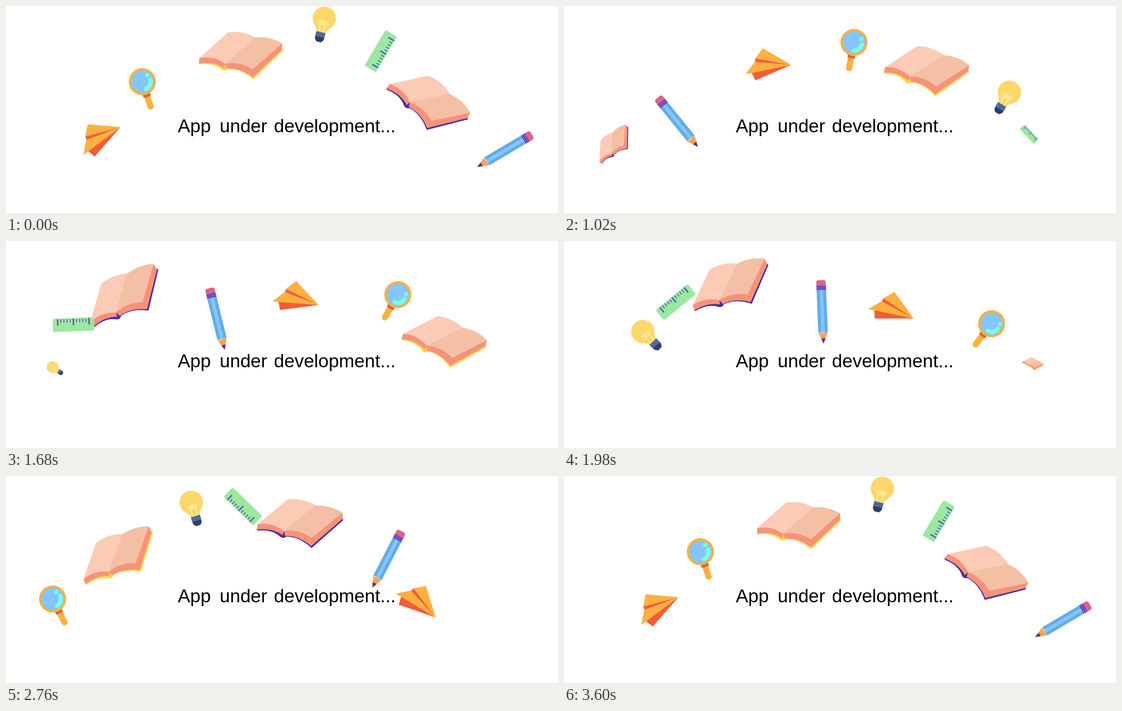
An HTML page that plays this animation: 1160x436 px, repeating every 3630 ms.

```html
<!DOCTYPE html>
<html lang="en">
<head>
<meta charset="utf-8">
<title>App under development</title>
<style>
  html, body { margin: 0; width: 100%; height: 100%; overflow: hidden; background: #fff; }
  svg { display: block; width: 100%; height: 100%; }
  text { font: 39px "Liberation Sans", Arial, sans-serif; }
  .orange { fill: #fcb040; }
  .red { fill: #f15d3a; }
</style>
</head>
<body>
<svg viewBox="0 0 1160 436">
  <defs>
    <g id="book" transform="translate(-493 -104)">
      <path fill="currentColor" d="M405 121L407 124Q436 119 454 134Q460 139 467 133Q494 132 520 154L582 93L580 88L519 148Q490 128 461 131Q434 113 406 119Z"/>
      <path fill="#f69279" d="M406 111V122Q437 116 461 132Q492 129 519 150L580 91V78L524 66Z"/>
      <path fill="#fbcbb6" d="M406 111L466 56Q497 51 524 66L461 122Q435 104 406 111Z"/>
      <path fill="#f3c0a5" d="M524 66Q555 63 580 78L519 133Q491 116 461 122Z"/>
      <path fill="currentColor" d="M461 122L458 134H465Z"/>
    </g>
  </defs>

  <text y="266"><tspan x="361">App</tspan> <tspan x="449">under</tspan> <tspan x="563">development...</tspan></text>

  <g id="purpleBook" color="#4c2d9f"><use href="#book" transform="scale(1.02)"/></g>
  <g id="yellowBook" color="#ffd33f"><use href="#book"/></g>

  <g id="plane">
    <path class="red" d="M-35 -8L39 -28L-32 0ZM-30 22L39 -28L-15 34Z"/>
    <path class="orange" d="M-30 -34L39 -28L-35 -8ZM-33 -1L39 -28L-39 31Z"/>
  </g>

  <g id="magnifier">
    <path class="orange" d="M-6.5 34H6.5V55A6.5 6.5 0 0 1 -6.5 55Z"/>
    <path fill="#d5683b" d="M-8 26H8V32L6.5 34H-6.5L-8 32Z"/>
    <circle class="orange" r="28.5"/>
    <circle r="23.5" fill="#85c5fd"/>
    <circle cx="14" cy="-10" r="4.5" fill="#7dfae4"/>
    <path d="M17 1A16.5 16.5 0 0 1 2 17" fill="none" stroke="#7dfae4" stroke-width="9" stroke-linecap="round"/>
  </g>

  <g id="bulb">
    <path fill="#fcd76a" d="M-9.5 31Q-11 23 -18 16.5A24.5 24.5 0 1 1 18 16.5Q11 23 9.5 31Z"/>
    <path fill="none" stroke="#fdf0a8" stroke-width="2" d="M-4 30L-6 14C-12 12 -11 5 -7 6S-4 14 -2 14S-3 5 0 5S1 14 3 14S4 6 7 6S11 12 6 14L4 30"/>
    <path fill="#53699c" d="M-10 30H10V40H-10Z"/>
    <path fill="#2b4069" d="M-9.5 40H9.5V45L5 51H-5L-9.5 45Z"/>
  </g>

  <g id="ruler">
    <rect x="-43.5" y="-14" width="87" height="28" rx="4" fill="#9ce8a1"/>
    <path id="ticks" stroke="#5460ae" stroke-width="2"/>
    <path id="longTicks" stroke="#5460ae" stroke-width="3"/>
  </g>

  <g id="pencil">
    <path fill="#de6484" d="M-54 -10H-62Q-67 -10 -67 -4V4Q-67 10 -62 10H-54Z"/>
    <path fill="#8a6cf0" d="M-55 -10H-46V10H-55Z"/>
    <path stroke="#4c2d9f" stroke-width="1.5" d="M-54 -10V10M-50.5 -10V10M-47 -10V10"/>
    <path fill="#62ade6" d="M-46 -10H43V10H-46Z"/>
    <path fill="#86c5fb" d="M-46 -3.5H44V3.5H-46Z"/>
    <path fill="#ffa050" d="M43 -10L67 0L43 10L45 3Z"/>
    <path fill="#553092" d="M56 -4.5L67 0L56 4.5Z"/>
  </g>
</svg>
<script>
const STEP = 30, CYCLE = 3600, LOOP = CYCLE + STEP, FADE = 200;

// A part flies along circular arcs from its first stop to its last.
// Stop: time, place, tilt, and how far the path turns on the way there.
const stop = (time, x, y, tilt, turn = 0) => ({ time, x, y, tilt, turn });

const parts = {
  purpleBook: [stop(915, 90, 325, -46), stop(1680, 249, 118, -32, 30),
               stop(CYCLE, 886, 203, 30.3, 48), stop(CYCLE + 780, 1022, 308, 43, 12)],
  yellowBook: [stop(2190, 84, 269, -48), stop(CYCLE, 493, 104, 0.5, 37), stop(CYCLE + 2030, 995, 267, 18, 44.7)],
  plane: [stop(3030, 122, 419, -14), stop(CYCLE + 510, 300.7, 182.6, 12.9, 28.6), stop(CYCLE + 3030, 907, 331, 74.6, 87.5)],
  magnifier: [stop(2540, 52, 291, -29), stop(CYCLE, 286.5, 159.5, -18.4, 14),
              stop(CYCLE + 1680, 823.5, 113, 29.7, 48), stop(CYCLE + 2400, 978, 284, 49, 30)],
  bulb: [stop(1580, 78, 293, -59), stop(CYCLE, 669, 26, 13.8, 62.6), stop(CYCLE + 1460, 1011, 294, 38, 52)],
  ruler: [stop(1300, 34, 253, 44.6), stop(CYCLE, 787.5, 95, -239.4, 56.5), stop(CYCLE + 1120, 988, 294, -321, 47.6)],
  pencil: [stop(390, 76, 376.5, 27), stop(CYCLE + 220, 1102.4, 354, 157.7, 92.1)]
};

const $ = id => document.getElementById(id);
const clamp = v => Math.max(0, Math.min(1, v));
const rad = degrees => degrees * Math.PI / 180;

// Point at share u of the arc from a to b: the chord, shortened and swung back.
function alongArc(a, b, u) {
  const half = rad(b.turn) / 2;
  const reach = Math.sin(half * u) / Math.sin(half), swing = half * (u - 1);
  const dx = (b.x - a.x) * reach, dy = (b.y - a.y) * reach;
  const cos = Math.cos(swing), sin = Math.sin(swing);
  return [a.x + dx * cos - dy * sin, a.y + dx * sin + dy * cos];
}

function pose(name, t) {
  const stops = parts[name];
  const born = stops[0].time, gone = stops[stops.length - 1].time;
  const time = t < born ? t + CYCLE : t;
  const scale = clamp(Math.min(time - born, gone - time) / FADE);
  const el = $(name);
  el.style.display = scale ? "" : "none";
  if (!scale) return;

  const next = stops.findIndex(s => s.time >= time);
  const a = stops[next - 1], b = stops[next];
  const u = (time - a.time) / (b.time - a.time);
  const [x, y] = alongArc(a, b, u);
  const tilt = a.tilt + (b.tilt - a.tilt) * u;
  el.setAttribute("transform", `translate(${x} ${y}) rotate(${tilt}) scale(${scale})`);
}

function drawTicks() {
  let small = "", long = "";
  for (let i = -5; i <= 5; i++) {
    const x = i * 6.6;
    if (i % 5) small += `M${x} -12V-5`;
    else long += `M${x} -13V1`;
  }
  $("ticks").setAttribute("d", small);
  $("longTicks").setAttribute("d", long);
}

const start = performance.now();
function render() {
  const t = Math.floor((performance.now() - start) % LOOP / STEP) * STEP;
  for (const name in parts) pose(name, t);
  requestAnimationFrame(render);
}
drawTicks();
render();
</script>
</body>
</html>
```
